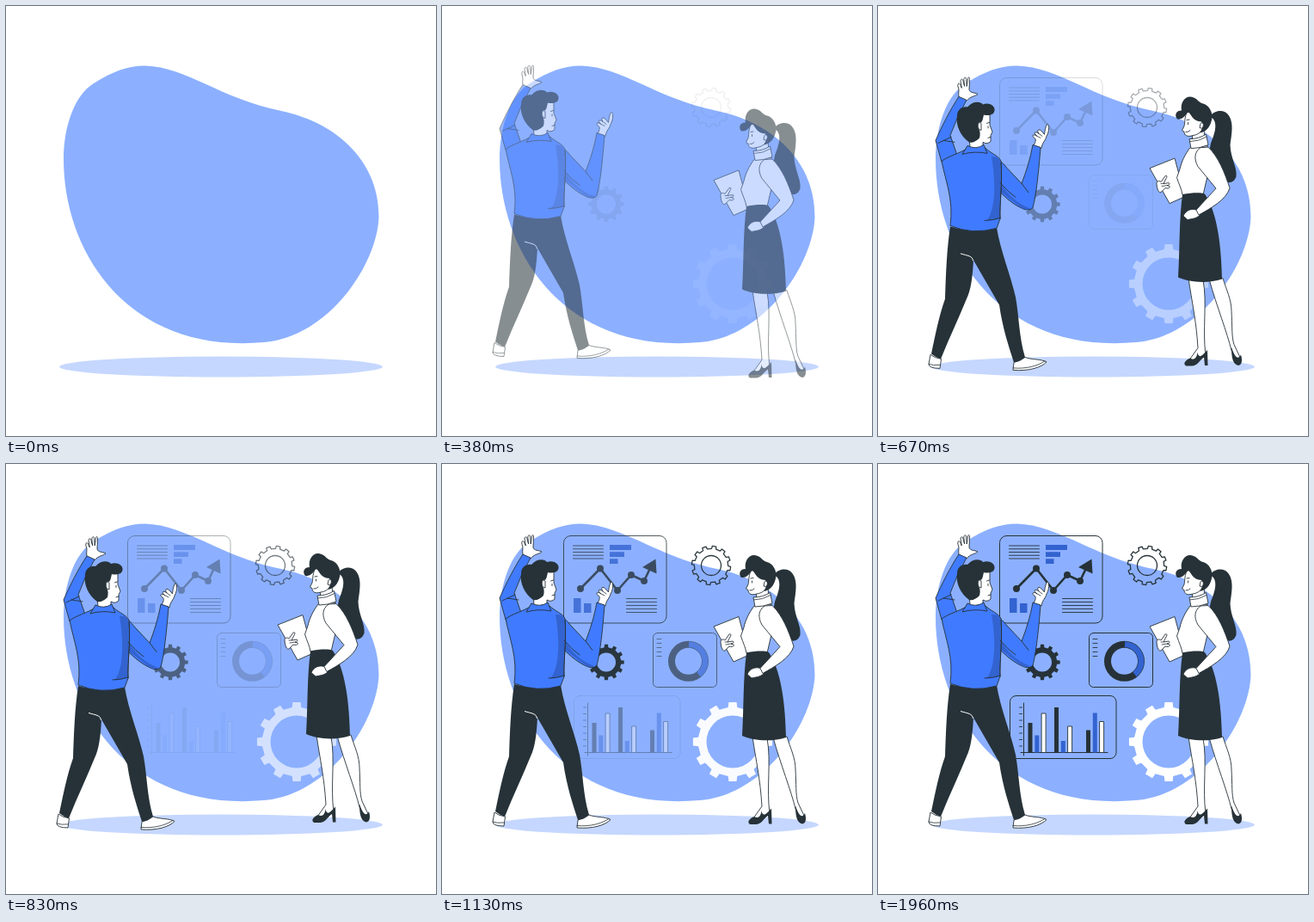
An HTML page that plays this animation: 500 px wide and 500 px high, repeating every 2 s.

```html
<!DOCTYPE html>
<html lang="en">
<head>
<meta charset="utf-8">
<title>Presentation</title>
<style>
html, body { margin: 0; width: 100%; height: 100%; overflow: hidden; background: #fff; }
svg { display: block; width: 100%; height: 100%; }
.l { fill: none; stroke: #263238; stroke-linecap: round; stroke-linejoin: round; }
.w { fill: #fff; stroke: #263238; stroke-width: .9; stroke-linejoin: round; }
.b { fill: #407bff; stroke: #263238; stroke-width: .9; stroke-linejoin: round; }
.d { fill: #263238; }
.s { fill: #3363d0; }
</style>
</head>
<body>
<svg viewBox="0 0 500 500">
  <path fill="#8cb0ff" d="M102 90C125 75 145 69 162 69.5C210 71 250 108 320 122C390 137 434 185 433.5 245C432 300 375 385 300 391C145 405 67 290 67 178C67 140 80 103 102 90Z"/>
  <ellipse cx="250" cy="419.5" rx="188" ry="12" fill="#c5d7ff"/>

  <g id="gears"></g>

  <g id="trend">
    <rect class="l" x="141.5" y="83.5" width="119.5" height="101.5" rx="8"/>
    <path id="notes" class="l" stroke-width=".9"/>
    <path class="s" d="M195 94h25v6h-25zM195 102.3h17v5.7h-17zM195 110.3h9.5v5.7h-9.5zM153 156h8.5v17h-8.5zM165 162h8.5v11h-8.5z"/>
    <path class="l" stroke-width="2.6" d="M161 145L184 121.5L204 147L220 129L235 136L243 119"/>
    <path class="l" stroke-width="8" d="M161 145h0M184 121.5h0M204 147h0M220 129h0M235 136h0"/>
    <path class="d" d="M248.5 110.5L249.5 127.5L233 120Z"/>
  </g>

  <g id="donut">
    <rect class="l" x="245.5" y="196.5" width="74" height="63" rx="5"/>
    <path class="l" stroke-width=".9" d="M250 203.5h5M250 208.5h5M250 213.5h5M250 218.5h5M250 223.5h5"/>
    <circle class="l" cx="286.5" cy="229.3" r="19.5" stroke-width="8"/>
    <path fill="none" stroke="#3363d0" stroke-width="6.6" d="M287 209.8A19.5 19.5 0 0 1 298.5 244.7"/>
  </g>

  <rect id="frame" class="l" x="153.5" y="269.5" width="123.5" height="73" rx="7"/>
  <g id="bars">
    <path class="l" d="M169.5 278V339M166 335.5H267"/>
    <path id="ticks" class="l" stroke-width=".9"/>
  </g>

  <g id="man">
    <path class="w" d="M94 106C93 100 95 97 93 93.5C92 89 95 88.5 96 92L97.3 95L96 87C96.3 84 98.6 84 99 87L100.6 93L99.8 85C100.2 82 102.6 82 102.7 85L103.2 93L104.5 84C105 81.8 106.8 82.3 106.5 85L106 97C107 101 112 100 116 102C113 105 108 104 103 110Z"/>
    <path class="b" d="M94 105C84 120 74 140 67 156L74 181L92 173L84 150Q92 128 103 109Z"/>
    <path class="l" stroke-width=".9" d="M70 159L85 152M76 156L89 158"/>
    <path class="w" d="M181 162C184 156 184 154 181 152.5C178.5 150 181 148 185 151C180 147 182.5 144.5 187 148C184 143.5 187 141.5 191 146L193.5 149C194 144 195 139 196.8 137C199.6 137 199 147 196 151C195 156 191 158 190 165Z"/>
    <path class="l" stroke-width=".8" d="M185 151l4 2M187 148l4 3"/>
    <path class="d" d="M84 256Q110 264 138 257C142 283 155 315 160 338C164 360 164 385 171 408Q165 413 158 414C152 395 145 375 141 347L111 295C110 315 108 330 103 340C94 362 83 385 73 410Q67 408 62 404C67 380 71 360 78 340C79 310 80 282 84 256Z"/>
    <path fill="none" stroke="#fff" stroke-width="1" d="M96 287.5C104 290 110 290 110.5 296"/>
    <path class="w" d="M61 405L59 416Q59 421 72 421L73.5 410Q66 409 61 405Z"/>
    <path class="l" stroke-width=".8" d="M59 416Q64 418 72 417"/>
    <path class="w" d="M158 414L157 423C175 424.5 190 420 196 413.5C190 410 178 411 171 408Q165 413 158 414Z"/>
    <path class="l" stroke-width=".8" d="M157 420.5C172 422 186 418 194 412.5"/>
    <path class="b" d="M131 174C140 176 145 182 150 188L167 206C172 193 177 178 180 161L189 164C187 190 184 220 180 234Q177 238 170 236C158 231 150 224 141 215Z"/>
    <path class="s" d="M143 206C150 218 160 228 177 235Q173 237 168 235L142 215Z"/>
    <path class="l" stroke-width=".9" d="M167 206L175 216.5"/>
    <path class="b" d="M74 180C82 174 95 171 104 165L124 164C132 172 140 173 143 180C145 205 141 230 142 247L138 258Q110 266 84 255C88 225 79 205 74 180Z"/>
    <path class="s" d="M132 175Q142 174 142.5 183C144 205 140.5 230 141.3 247L126 250C137 236 137 205 132 175Z"/>
    <path class="l" stroke-width=".9" d="M143 182C145 205 141 230 142 247M142 205Q151 216 160 222M124 249Q134 249 142 246"/>
    <path class="w" d="M106 152L107 164Q115 169 122 163L122 158Q127 161 131 157L131 150L133 146L130 138L130 123L112 123Z"/>
    <path class="b" d="M104 162Q114 167 123 161L127 171Q112 168 98 172Z"/>
    <path class="d" d="M106 158C96 151 90 138 92 127C92 120 98 116 104 117C110 110 119 110 122 114C130 111 138 117 135 123C133 127 126 127 123 126C122 130 122 132 120 135C116 134 115 139 117 142C119 145 119 149 118 153C114 157 110 159 106 158Z"/>
    <path class="w" d="M120 136C116 133 115 140 118 143.5L120 144Z"/>
    <path class="l" stroke-width=".9" d="M128 139.5v2M126.5 136l3-1M128 153l3-1"/>
  </g>

  <g id="woman">
    <path class="d" d="M386 129C391 121 403 120 408 128C414 137 411 150 409.5 162C410 178 418 188 416.5 199C413 208 405 207 400 201C389 190 383 175 387 160C391 150 395 139 390 132Z"/>
    <path class="w" d="M385 318L401 317C405 330 411 342 411 355C412 372 411 385 414 394L422 411L418 416L411 401C406 380 394 350 385 318Z"/>
    <path class="d" d="M411 397C415 410 419 412 422 406C424 413 423 418 419 418.5C413 417 411 411 411 397Z"/>
    <path class="w" d="M361 317C365 345 370 365 372 398L362 412L374 413L381 406C377 378 383 345 378 319Z"/>
    <path class="d" d="M371.5 403C373 412 378 406 383 400.5L383.5 418.5H380L379 409C374 411 373 418 366 419H358C354 416 358 412 363 410C368 413 371 409 371.5 403Z"/>
    <path class="w" d="M316 189L345 177.5L357 222L339 230Z"/>
    <path class="w" d="M363 165C357 173 353 181 351 190L347.5 200C350 208 353 213 354 220Q367 221 378 220L385 190L383 163Z"/>
    <path class="w" d="M324 206C325 203 328 204 329 205L334 198C336 197 336.5 199 335 201L332 207L338 206C340 207 339 208.5 336 209L339 210C340 212 338 213 334 212L330 216C327 220 324 213 324 206Z"/>
    <path class="l" stroke-width=".8" d="M329 207l3 0M330 210l6-1"/>
    <path class="d" d="M354 219.5C366 217 376 217 380 219C391 235 399 265 400 318C385 323 363 322.5 349 316C351 280 350 250 354 219.5Z"/>
    <path class="w" d="M372 238C364 235 358 238 355 244.5L360 249C366 247.5 369 248 374 244Z"/>
    <path class="w" d="M375 165C368 170 367 178 372 187L393 212.5L370 237.5L373 243.5C386 236 405 226 409 212C403 194 396 176 384 164.5Z"/>
    <path class="w" d="M365 148L366 158H380L379 143Z"/>
    <path class="w" d="M362 155Q373 155 381.5 149.5L384 162Q374 166 364 166Z"/>
    <path class="l" stroke-width=".8" d="M362.5 158Q373 158 382 152.5"/>
    <path class="w" d="M359 124C356 132 357 137 356 140L353.5 145L356 146.5C356 151 360 153 366 151C373 150 378 146 378 138L375 122Z"/>
    <path class="d" d="M348 132C344 127 347 122 353 122C351 111 359 103 367 107C372 109 373 113 378 114C385 116 390 124 388 133C386 142 381 147 374 148C378 143 378 139 376 135C366 135 364 126 361 124C358 125 356 133 348 132Z"/>
    <path class="w" d="M375 137C378 134 380 140 376.5 142.5L374 142Z"/>
    <path class="l" stroke-width=".9" d="M360.5 136v2M359 133l3-.5M358 147Q361 147.5 363 145"/>
  </g>
</svg>
<script>
const $ = id => document.getElementById(id);
const DARK = '#263238';

const gear = (x, y, outer, root, hole, phase, style) => {
  const step = Math.PI / 6, pts = [];
  for (let i = 0; i < 12; i++)
    for (const [r, k] of [[root, -.25], [outer, -.19], [outer, .19], [root, .25]]) {
      const a = (i + k + phase) * step;
      pts.push(`${(x + r * Math.sin(a)).toFixed(2)} ${(y - r * Math.cos(a)).toFixed(2)}`);
    }
  return `<path fill-rule="evenodd" stroke-linejoin="round" ${style} d="M${pts.join('L')}Z` +
    `M${x - hole} ${y}a${hole} ${hole} 0 1 0 ${2 * hole} 0a${hole} ${hole} 0 1 0 ${-2 * hole} 0Z"/>`;
};
$('gears').innerHTML =
  gear(313, 118, 22.7, 19.7, 11.5, .3, `fill="none" stroke="${DARK}" stroke-width="1.3"`) +
  gear(191, 230.5, 20.8, 17.3, 11, 0, `fill="${DARK}"`) +
  gear(338, 323, 46.3, 40.3, 30.5, 0, 'fill="#fff"');

// Rows of equal short lines
const rows = (x, y, width, gap, count) =>
  Array.from({ length: count }, (_, i) => `M${x} ${y + i * gap}h${width}`).join('');
$('notes').setAttribute('d', rows(152.5, 95, 35, 3.75, 5) + rows(214.5, 156.5, 35, 4, 5));
$('ticks').setAttribute('d', rows(164.5, 283, 3, 7.5, 7));

const groups = [[174.5, 301, 315.5, 290], [205, 283, 322, 305], [242, 309.5, 289.5, 299.5]];
$('bars').innerHTML += groups.map(([x, ...tops]) => tops.map((top, i) =>
  `<rect class="${'dsw'[i]}" x="${x + i * 7.8}" y="${top}" width="5" height="${335.5 - top}"/>`
).join('')).join('');

const clamp = v => Math.max(0, Math.min(1, v));
const bez = (t, a, b) => 3 * (1 - t) ** 2 * t * a + 3 * (1 - t) * t * t * b + t ** 3;
// Easing with a slight overshoot
const ease = x => {
  let lo = 0, hi = 1;
  for (let i = 0; i < 24; i++) {
    const mid = (lo + hi) / 2;
    if (bez(mid, .36, .5) < x) lo = mid; else hi = mid;
  }
  return bez(hi, -.01, 1.38);
};

// Each part: id, start, duration, vertical offset to slide in from
const parts = [
  ['man', -25, 1000, -30], ['woman', -25, 1000, 30],
  ['gears', 170, 1500, 0], ['trend', 340, 1500, 0], ['donut', 470, 1500, 0],
  ['bars', 640, 1500, 0], ['frame', 890, 1500, 0]
];

function draw(now) {
  const t = now % 2000;
  for (const [id, start, span, dy] of parts) {
    const p = ease(clamp((t - start) / span));
    $(id).setAttribute('transform', `translate(0 ${dy * (1 - p)})`);
    $(id).setAttribute('opacity', clamp(p));
  }
}
const begin = performance.now();
function tick() {
  draw(performance.now() - begin);
  requestAnimationFrame(tick);
}
tick();
</script>
</body>
</html>
```
